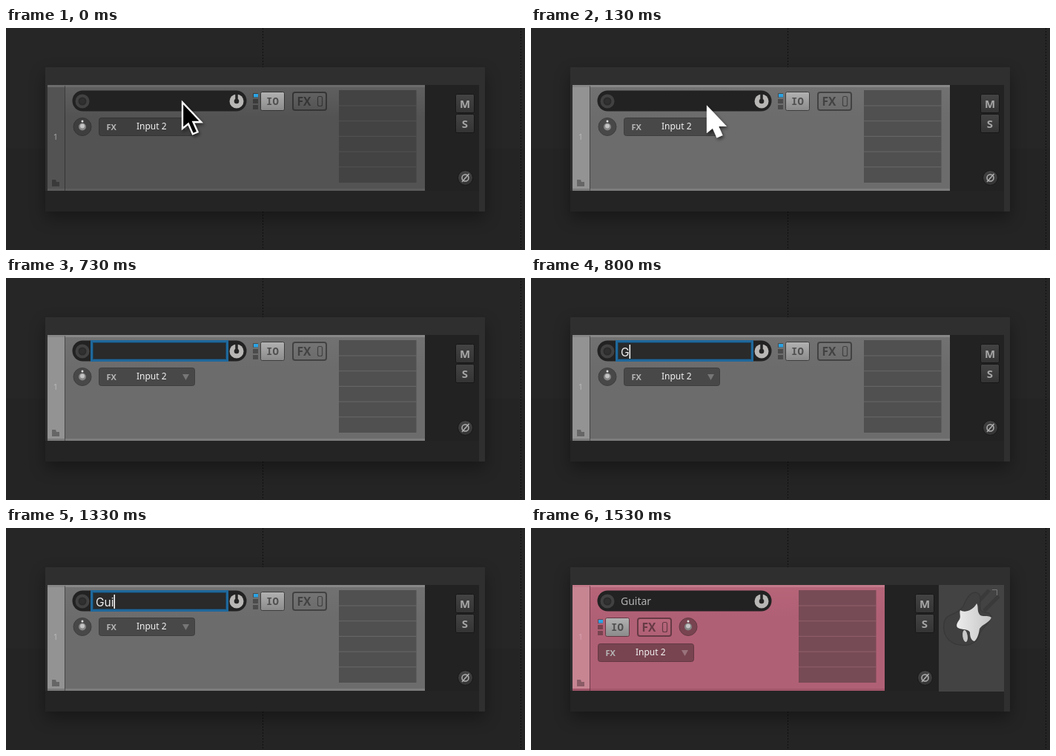
Animation, 700 px wide and 300 px high, one loop 3.27 s. Source, as an HTML page:

```html
<!DOCTYPE html>
<html lang="en">
<head>
<meta charset="utf-8">
<title>Naming a track</title>
<style>
html, body { margin: 0; width: 100%; height: 100%; overflow: hidden; background: #262626; }
svg { display: block; width: 100%; height: 100%; }
text { font-family: "Noto Sans", sans-serif; }

/* Track themes */
svg {
  --tab: #535353; --top: #606060; --body: #535353; --edge: #6c6c6c; --base: #5c5c5c;
  --list: #434343; --rule: #535353; --field: #3e3e3e; --line: #343434; --ink: #353535;
  --face: #626262; --number: #a5a5a5; --led: #3b3b3b;
}
.selected {
  --tab: #939393; --top: #727272; --body: #6c6c6c; --edge: #888; --base: #7c7c7c;
  --list: #505050; --rule: #686868; --field: #484848; --line: #3e3e3e; --ink: #424242;
  --face: #747474; --number: #b8b8b8; --led: #4b4b4b;
}
.coloured {
  --tab: #c78592; --top: #b76579; --body: #b06075; --edge: #c47a8b; --base: #a2566a;
  --list: #774b55; --rule: #90606b; --field: #784450; --line: #643844; --ink: #663a45;
  --face: #b9687c; --number: #d79fac; --led: #77434f;
}
.coloured .right { transform: translate(-88px, 0); }
.coloured .routing { transform: translate(-243px, 35px); }
.coloured .pan { transform: translate(109px, 0); }
.coloured .input { transform: translate(-35px, 35px); }
.coloured .track { width: 421px; }

.bold { font-weight: 700; }
.heavy { font-weight: 800; }
.medium { font-weight: 500; }
.mono { font-family: "Noto Sans Mono", monospace; font-weight: 800; }
.typing { font: 15.5px Inter, sans-serif; }
[hidden] { display: none; }
</style>
</head>
<body>
<svg id="stage" viewBox="0 0 700 300">
  <defs>
    <linearGradient id="bodyFill" x2="0" y2="1">
      <stop offset="0" stop-color="var(--top)"/><stop offset=".3" stop-color="var(--body)"/>
    </linearGradient>
    <linearGradient id="faceFill" x2="0" y2="1">
      <stop offset="0" stop-color="var(--face)"/><stop offset="1" stop-color="var(--body)"/>
    </linearGradient>
    <linearGradient id="silver" x2="0" y2="1">
      <stop offset="0" stop-color="#b2b2b2"/><stop offset="1" stop-color="#8a8a8a"/>
    </linearGradient>
    <linearGradient id="key" x2="0" y2="1">
      <stop offset="0" stop-color="#434343"/><stop offset="1" stop-color="#343434"/>
    </linearGradient>
    <linearGradient id="pearl">
      <stop offset="0" stop-color="#ececec"/><stop offset="1" stop-color="#c4c4c4"/>
    </linearGradient>
    <filter id="blur" x="-20%" y="-30%" width="140%" height="160%"><feGaussianBlur stdDeviation="11"/></filter>
    <filter id="drop" x="-40%" y="-30%" width="200%" height="180%">
      <feDropShadow dx="2" dy="3" stdDeviation="2.5" flood-opacity=".55"/>
    </filter>
  </defs>

  <rect width="700" height="300" fill="#262626"/>
  <rect y="163" width="700" height="137" fill="#242424"/>
  <path d="M346.5 0V300M694.5 0V300" stroke="#101010" stroke-dasharray="2 2"/>
  <rect x="53" y="62" width="593" height="195" fill="#000" opacity=".35" filter="url(#blur)"/>
  <rect x="53" y="53" width="593" height="195" fill="#2f2f2f"/>
  <rect x="56" y="77" width="582" height="171" fill="#222"/>
  <rect x="53" y="220" width="585" height="28" fill="#242424"/>

  <!-- Track body -->
  <rect class="track" x="56" y="77" width="509" height="143" fill="url(#bodyFill)"/>
  <rect x="56" y="77" width="23" height="143" fill="var(--tab)"/>
  <rect class="track" x="56" y="77" width="509" height="3" fill="var(--edge)"/>
  <rect class="track" x="56" y="217" width="509" height="3" fill="var(--base)"/>
  <path d="M79.5 78V220" stroke="#000" opacity=".35"/>
  <text x="67" y="151" text-anchor="middle" font-size="11" fill="var(--number)">1</text>
  <path d="M62 205h5l1 3h4v6H62z" fill="#000" opacity=".3"/>

  <g class="right">
    <rect x="449" y="84" width="104.500" height="125" fill="var(--list)"/>
    <path d="M449 105h104.500m-104.500 20.700h104.500m-104.500 20.700h104.500m-104.500 20.700h104.500m-104.500 20.700h104.500" stroke="var(--rule)"/>
    <g fill="url(#key)" stroke="#171717">
      <rect x="606.500" y="89.500" width="25" height="25" rx="2"/>
      <rect x="606.500" y="116.500" width="25" height="25" rx="2"/>
      <circle cx="619.500" cy="202.500" r="10"/>
    </g>
    <g class="bold" fill="#a6a6a6" font-size="15" text-anchor="middle">
      <text x="619" y="107.500">M</text><text x="619" y="134.500">S</text>
    </g>
    <g fill="none" stroke="#b0b0b0" stroke-width="1.500">
      <circle cx="619.500" cy="202.500" r="4.500"/><path d="M615 208L624.500 197"/>
    </g>
  </g>

  <!-- Name pill -->
  <rect x="89.500" y="84.500" width="235" height="28" rx="14" fill="#222"/>
  <circle cx="103" cy="99" r="7.500" fill="#2b2b2b" stroke="#414141" stroke-width="4"/>
  <circle cx="103" cy="99" r="3.500" fill="#303030"/>
  <circle cx="311" cy="99" r="9.500" fill="#b9b7b5"/>
  <circle cx="311" cy="99" r="3.300" fill="#252525"/>
  <path d="M311 89V99" stroke="#252525" stroke-width="3.500"/>
  <text id="name" x="121" y="104" font-size="14" fill="#b4b4b4">Guitar</text>

  <g class="routing">
    <path d="M333 88h7v6h-7zM333 96h7v6h-7zM333 104h7v6h-7z" fill="var(--led)"/>
    <rect x="334" y="89" width="6" height="4.500" fill="#2ba3e4"/>
    <rect x="343.500" y="86.500" width="32" height="25" rx="2" fill="url(#silver)" stroke="var(--line)"/>
    <text class="mono" x="359.500" y="104" font-size="14" text-anchor="middle" fill="#505050">IO</text>
    <rect x="387" y="87" width="45" height="24" rx="3" fill="url(#faceFill)" stroke="var(--ink)" stroke-width="2"/>
    <rect x="420.500" y="92.500" width="6" height="13" rx="2" fill="none" stroke="var(--ink)" stroke-width="1.200"/>
    <text class="heavy" x="392.500" y="104.500" font-size="15.500" fill="var(--ink)">FX</text>
  </g>

  <g class="pan">
    <circle cx="103" cy="133.500" r="12" fill="var(--field)" stroke="var(--line)"/>
    <circle cx="103" cy="133.500" r="5" fill="#858585"/>
    <circle cx="103" cy="132.500" r="3" fill="#c4c4c4"/>
    <circle cx="103" cy="126" r="1.500" fill="#ddd"/>
  </g>

  <g class="input">
    <rect x="125.500" y="121.500" width="129" height="24" rx="3" fill="var(--field)" stroke="var(--line)"/>
    <text class="bold" x="135.500" y="138" font-size="11" fill="#b6b6b6">FX</text>
    <text class="medium" x="176" y="137" font-size="12" fill="#f2f2f2">Input 2</text>
    <path d="M238 130h9l-4.500 8z" fill="#fff" opacity=".25"/>
  </g>

  <g id="editor">
    <rect x="115.500" y="85.500" width="183" height="26" fill="#2a2a2a" stroke="#1f689b" stroke-width="3"/>
    <rect x="117.500" y="87.500" width="179" height="22" fill="none" stroke="#1b4059"/>
    <text id="typed" class="typing" x="121" y="106" fill="#eee"></text>
    <rect id="caret" y="90" width="1.500" height="19" fill="#fff"/>
  </g>

  <!-- Instrument picture -->
  <g id="picture">
    <rect x="550" y="77" width="88" height="144" fill="#434343"/>
    <path d="M599 104L618 84M611 112L631 92" stroke="#3a3a3a" stroke-width="5"/>
    <path d="M557 130C558 114 573 120 583 106C588 92 596 83 604 89C609 94 603 105 607 112C613 116 618 112 621 120C617 132 607 134 604 146C599 159 585 160 573 157C562 153 555 143 557 130Z" fill="#404040" stroke="#393939" stroke-width="1.500"/>
    <path d="M601 102C604 106 601 111 605 117C609 121 615 117 621 121C618 128 609 130 605 136C604 143 602 150 598 153C594 152 592 148 592 141C590 136 582 138 576 135C573 133 574 129 577 125C581 120 577 115 579 111C584 115 596 112 601 102Z" fill="url(#pearl)"/>
    <ellipse cx="585.500" cy="146" rx="3.300" ry="8" fill="#c9c9c9" transform="rotate(-8 585.500 146)"/>
    <path d="M622 83.500H628.500V91" fill="none" stroke="#777"/>
  </g>

  <g id="cursor" filter="url(#drop)">
    <path id="arrow" d="M0 0V38L8.500 31L15 46L22 43L15.500 28.500H27Z" stroke="#fff" stroke-width="2.500"/>
  </g>
</svg>
<script>
const LOOP = 3270;
const SELECT = 70, PRESS = 130, RELEASE = 200, EDIT = 270, BLINK = 730, DONE = 1530;
const KEYS = [800, 1130, 1270, 1340, 1400, 1470];
const [stage, title, editor, typed, caret, picture, cursor, arrow] =
  ["stage", "name", "editor", "typed", "caret", "picture", "cursor", "arrow"]
    .map(id => document.getElementById(id));

const show = (element, visible) => element.toggleAttribute("hidden", !visible);

function draw() {
  const t = performance.now() % LOOP;
  const done = t >= DONE;
  const pressed = t >= PRESS && t < RELEASE;

  stage.setAttribute("class", done ? "coloured" : t >= SELECT ? "selected" : "");
  show(title, done);
  show(picture, done);
  show(editor, t >= EDIT && !done);
  show(cursor, t < EDIT);

  cursor.setAttribute("transform", pressed ? "translate(238 107) scale(.87)" : "translate(238 100.500) scale(.93)");
  arrow.setAttribute("fill", pressed ? "#fff" : "#000");

  const text = "Guitar".slice(0, KEYS.filter(time => t >= time).length);
  typed.textContent = text;
  show(caret, t < BLINK || text);
  caret.setAttribute("x", 121 + (text ? typed.getComputedTextLength() : 0.5));

  requestAnimationFrame(draw);
}
draw();
</script>
</body>
</html>
```
